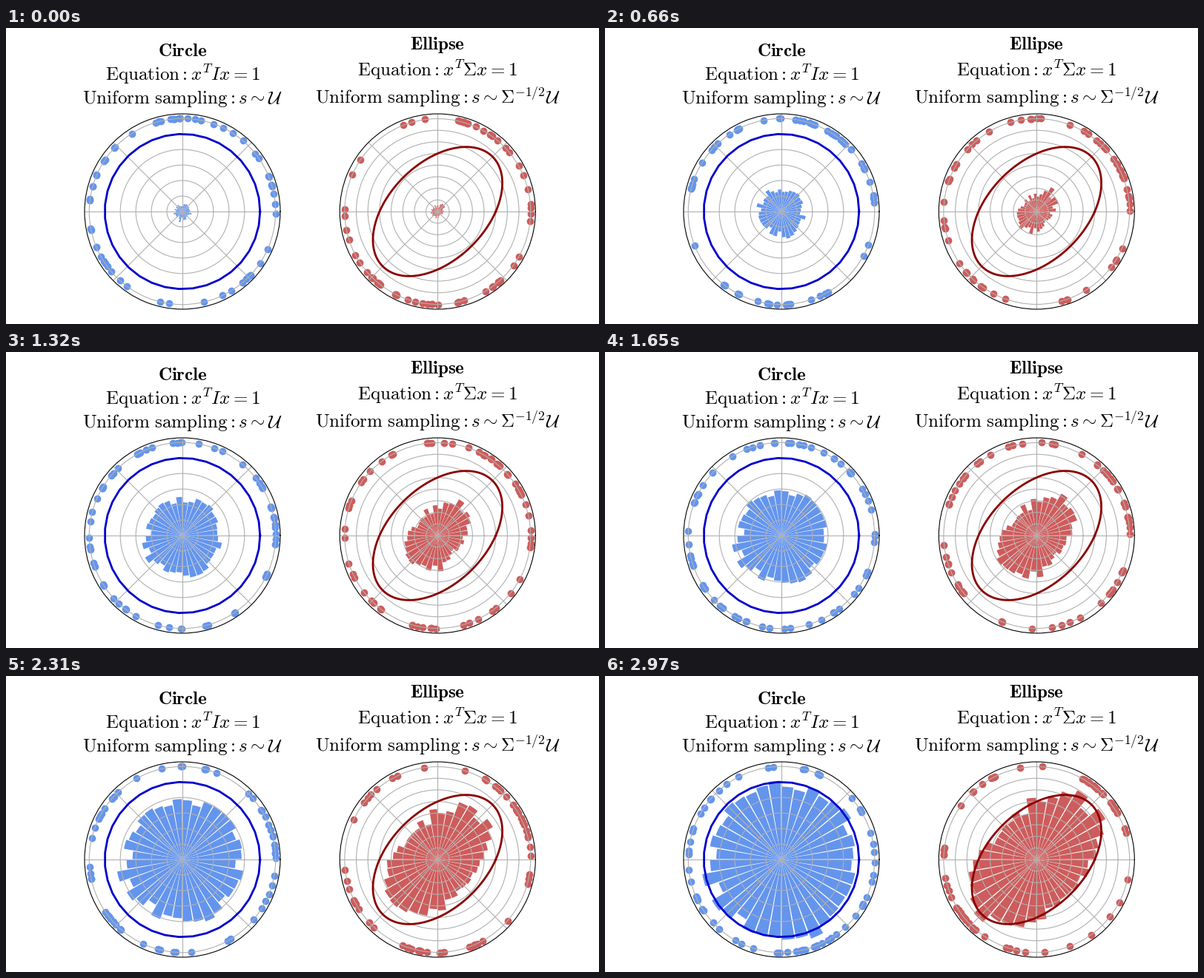
A matplotlib script for the animation above (3.3 s loop, 800 by 400 pixels).

```python
import numpy as np
import matplotlib.pyplot as plt
from matplotlib.animation import FuncAnimation

WIDTH, HEIGHT, DPI = 800, 400, 100
FRAMES, INTERVAL = 10, 330
BINS, DOTS = 36, 60
RADIUS, CENTER_Y = 132, 248
CORR = 0.44   # off-diagonal weight of the ellipse's matrix
BATCH = 30    # samples per bin in each frame; sets the noise of the bars

plt.rcParams["mathtext.fontset"] = "cm"
fig = plt.figure(figsize=(WIDTH / DPI, HEIGHT / DPI), dpi=DPI, facecolor="white")
rng = np.random.default_rng(7)

BIN = 2 * np.pi / BINS
mids = (np.arange(BINS) + 0.5) * BIN


class Panel:
    """Polar axes for the unit curve of [[1, -corr], [-corr, 1]]."""

    def __init__(self, cx, corr, fill, stroke, points):
        self.corr = corr
        ax = fig.add_axes([(cx - RADIUS) / WIDTH, 1 - (CENTER_Y + RADIUS) / HEIGHT,
                           2 * RADIUS / WIDTH, 2 * RADIUS / HEIGHT], projection="polar")
        rim = 1.2 / np.sqrt(1 - corr)
        batches = rng.gamma(BATCH, size=(FRAMES, BINS)) / BATCH
        self.heights = self.curve(mids) * np.cumsum(batches, axis=0) / FRAMES
        self.angles = self.directions((FRAMES, DOTS))
        self.rims = np.full(DOTS, rim)

        self.bars = ax.bar(mids, self.heights[0], width=0.9 * BIN, color=fill)
        self.dots = ax.scatter(self.angles[0], self.rims, color=fill)
        theta = np.linspace(0, 2 * np.pi, points)
        ax.plot(theta, self.curve(theta), color=stroke, lw=2)
        ax.set_ylim(0, rim * 1.05)
        ax.set_yticks(np.arange(0.2, rim + 0.01, 0.2))
        ax.set_xticklabels([])
        ax.set_yticklabels([])

    def curve(self, theta):
        return 1 / np.sqrt(1 - self.corr * np.sin(2 * theta))

    def directions(self, shape):
        """Angles of uniform circle points stretched along the diagonal."""
        phi = rng.uniform(0, 2 * np.pi, shape)
        x = np.cos(phi) / np.sqrt(1 - self.corr)
        y = np.sin(phi) / np.sqrt(1 + self.corr)
        return np.arctan2(y, x) + np.pi / 4

    def show(self, i):
        for bar, height in zip(self.bars, self.heights[i]):
            bar.set_height(height)
        self.dots.set_offsets(np.column_stack([self.angles[i], self.rims]))


def label(x, lines):
    for y, text in lines:
        fig.text(x / WIDTH, 1 - y / HEIGHT, f"${text}$", fontsize=18,
                 ha="center", va="baseline")


panels = [
    Panel(238, 0, "cornflowerblue", "mediumblue", 36),
    Panel(582.3, CORR, "indianred", "darkred", 200),
]

label(238, [
    (37.6, r"\mathbf{Circle}"),
    (70.5, r"\mathrm{Equation}: x^T I x = 1"),
    (101.7, r"\mathrm{Uniform\ sampling}: s \sim \mathcal{U}")])
label(582, [
    (29.5, r"\mathbf{Ellipse}"),
    (64.5, r"\mathrm{Equation}: x^T \Sigma x = 1"),
    (101.7, r"\mathrm{Uniform\ sampling}: s \sim \Sigma^{-1/2} \mathcal{U}")])


def update(i):
    for panel in panels:
        panel.show(i)
    return []


anim = FuncAnimation(fig, update, frames=FRAMES, interval=INTERVAL,
                     repeat=True, repeat_delay=0, blit=False)
plt.show()
```
